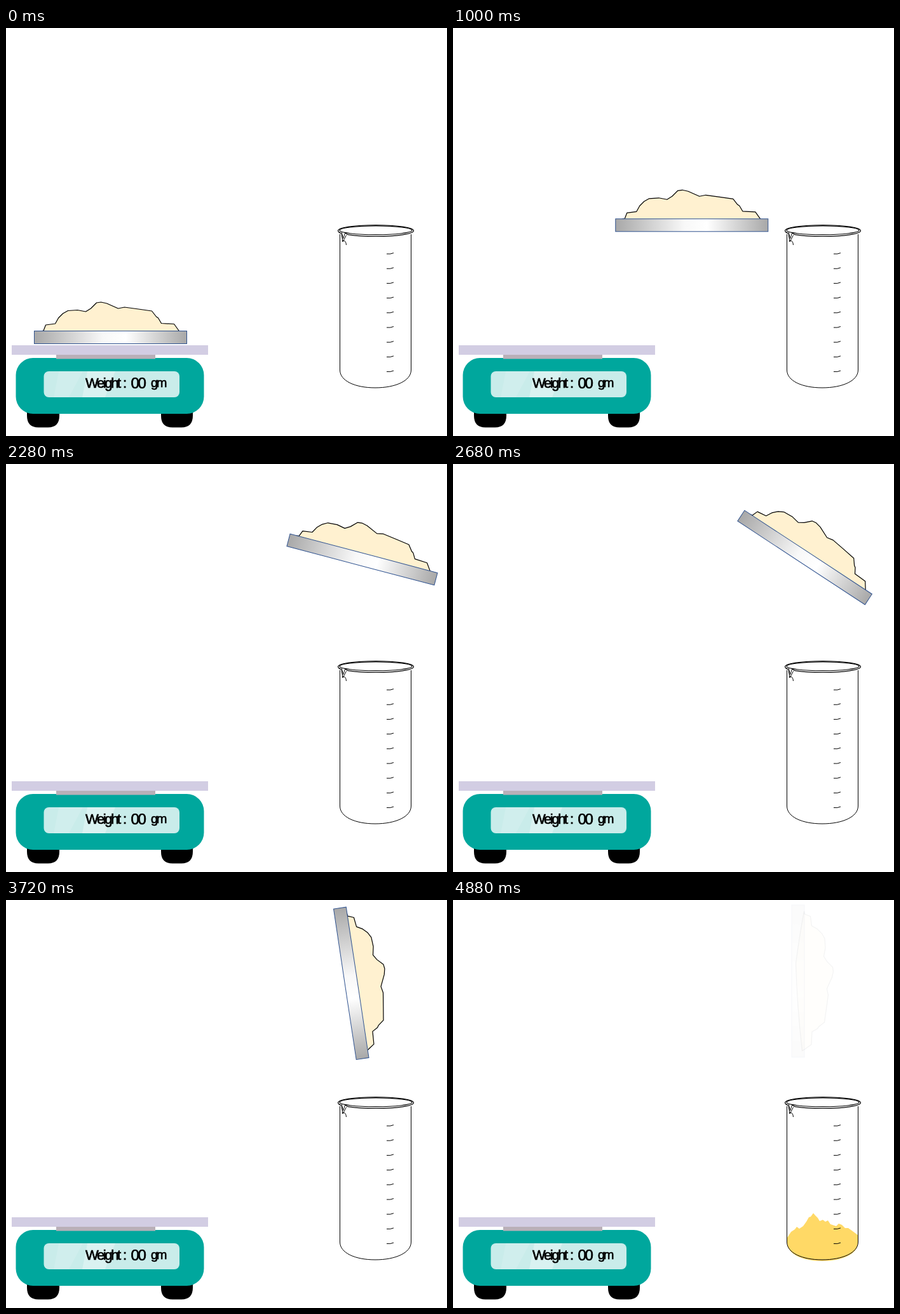
An HTML page that plays this animation: 694 px wide and 643 px high, repeating every 4920 ms.

```html
<!DOCTYPE html>
<html lang="en">
<head>
<meta charset="utf-8">
<title>Weighing powder into a beaker</title>
<style>
  html, body { margin: 0; width: 100%; height: 100%; overflow: hidden; background: #fff; }
  svg { display: block; width: 694px; height: 643px; }
  text { font: 22px "Liberation Sans", Arial, sans-serif; letter-spacing: -2.4px; stroke: #000; stroke-width: .7; }
  .line { fill: none; stroke: #000; stroke-width: 1; }
</style>
</head>
<body>
<svg viewBox="0 0 694 643">
  <defs>
    <linearGradient id="metal">
      <stop offset="0" stop-color="#a8a8a8"/>
      <stop offset=".45" stop-color="#f8f8f8"/>
      <stop offset=".6" stop-color="#fff"/>
      <stop offset="1" stop-color="#a8a8a8"/>
    </linearGradient>
    <clipPath id="screen"><rect x="59.500" y="541" width="213.500" height="41" rx="8"/></clipPath>
  </defs>

  <g id="scale">
    <path d="M33 600H84V611Q84 629.500 66 629.500H51Q33 629.500 33 611ZM244 600H294V611Q294 629.500 276 629.500H262Q244 629.500 244 611Z"/>
    <rect x="15.500" y="520" width="296" height="88" rx="27" fill="#00a79d"/>
    <rect x="79" y="513" width="156" height="8.500" fill="#b9b0b8"/>
    <rect x="9" y="500" width="309" height="15" fill="#d2cde3"/>
    <g clip-path="url(#screen)">
      <rect x="59" y="541" width="215" height="41" fill="#c9ecea"/>
      <g fill="#fff">
        <path d="M83 541H121L99 582H75Z" opacity=".12"/>
        <path d="M128 541H172L156 582H120Z" opacity=".3"/>
      </g>
    </g>
    <text x="125" y="566.500">Weight</text>
    <text x="184" y="566.500">:</text>
    <text x="196.500" y="567.500" style="font-size:24px">00</text>
    <text x="228" y="566" style="font-size:20px">gm</text>
  </g>

  <path id="powder" fill="#ffd966" d="M526 540V532L532 523L538 519L541 515L545 518L551 514L556 507L560 500L563 499L567 493.500L570 497L574 501L577 506L582 504L586 507L590 505L594 511L603 514L607 510L612 512L617 517L622 517L629 522L637 528V541C637 557 614 569 581 569S526 557 526 540Z"/>

  <g id="beaker" class="line">
    <path d="M525.500 325V539C525.500 556 549 567 581 567S637.500 556 637.500 539V325"/>
    <g stroke-width="1.200">
      <ellipse cx="582" cy="319.500" rx="59.500" ry="9"/>
      <ellipse cx="582" cy="318.800" rx="57" ry="7"/>
    </g>
    <path d="M526.500 321L530 338L536 325Z" fill="#fff" stroke="none"/>
    <path d="M523 321.500L528 324.500L530 337L535.500 326.500M528 321L530.500 332L533.500 323.500L537 323.500"/>
    <path d="M529 335Q535 334 535.500 342"/>
    <path id="ticks"/>
  </g>

  <!-- tray is drawn around the centre of its own box -->
  <g id="tray">
    <path fill="#fff1d0" stroke="#000" stroke-width="1.200" stroke-linejoin="round" d="M-105.500 13L-102 4L-87 2L-82 -7L-75 -14L-67 -18.500L-52 -19.500L-39 -17L-31 -22L-22 -31L-15 -32L-6 -30L12 -22L22 -24L44 -21L65 -18L72 -9L75 -7L80 1.500L100 2.500L107.500 13L110 17Q40 25 -28 27Q-80 20 -110 14Z"/>
    <rect x="-120" y="13.500" width="240" height="20" fill="url(#metal)" stroke="#2f528f"/>
  </g>
</svg>
<script>
  const LOOP = 4920, STEP = 40;
  const START = { x: 164.5, y: 464 }, END = { x: 566.5, y: 127.8 };
  const tray = document.getElementById("tray");
  const powder = document.getElementById("powder");

  const progress = (t, from, to) => Math.min(1, Math.max(0, (t - from) / (to - from)));
  const smooth = p => p - Math.sin(2 * Math.PI * p) / (2 * Math.PI);
  const mix = (a, b, p) => a + (b - a) * p;

  document.getElementById("ticks").setAttribute("d",
    Array.from({ length: 9 }, (_, i) => `M599 ${356 + i * 23.2}q6 .8 11 -1.500`).join(""));

  function draw() {
    const t = Math.floor((performance.now() % LOOP) / STEP) * STEP;
    const move = smooth(progress(t, 0, 1950));
    const angle = 90 * progress(t, 1960, 3905);
    const x = mix(START.x, END.x, move), y = mix(START.y, END.y, move);
    tray.setAttribute("transform", `translate(${x} ${y}) rotate(${angle})`);
    // each part fades on its own, so the heap shows through the tray
    for (const part of tray.children) part.setAttribute("opacity", 1 - progress(t, 3960, 4920));
    powder.setAttribute("visibility", t >= 3920 ? "visible" : "hidden");
    requestAnimationFrame(draw);
  }
  draw();
</script>
</body>
</html>
```
